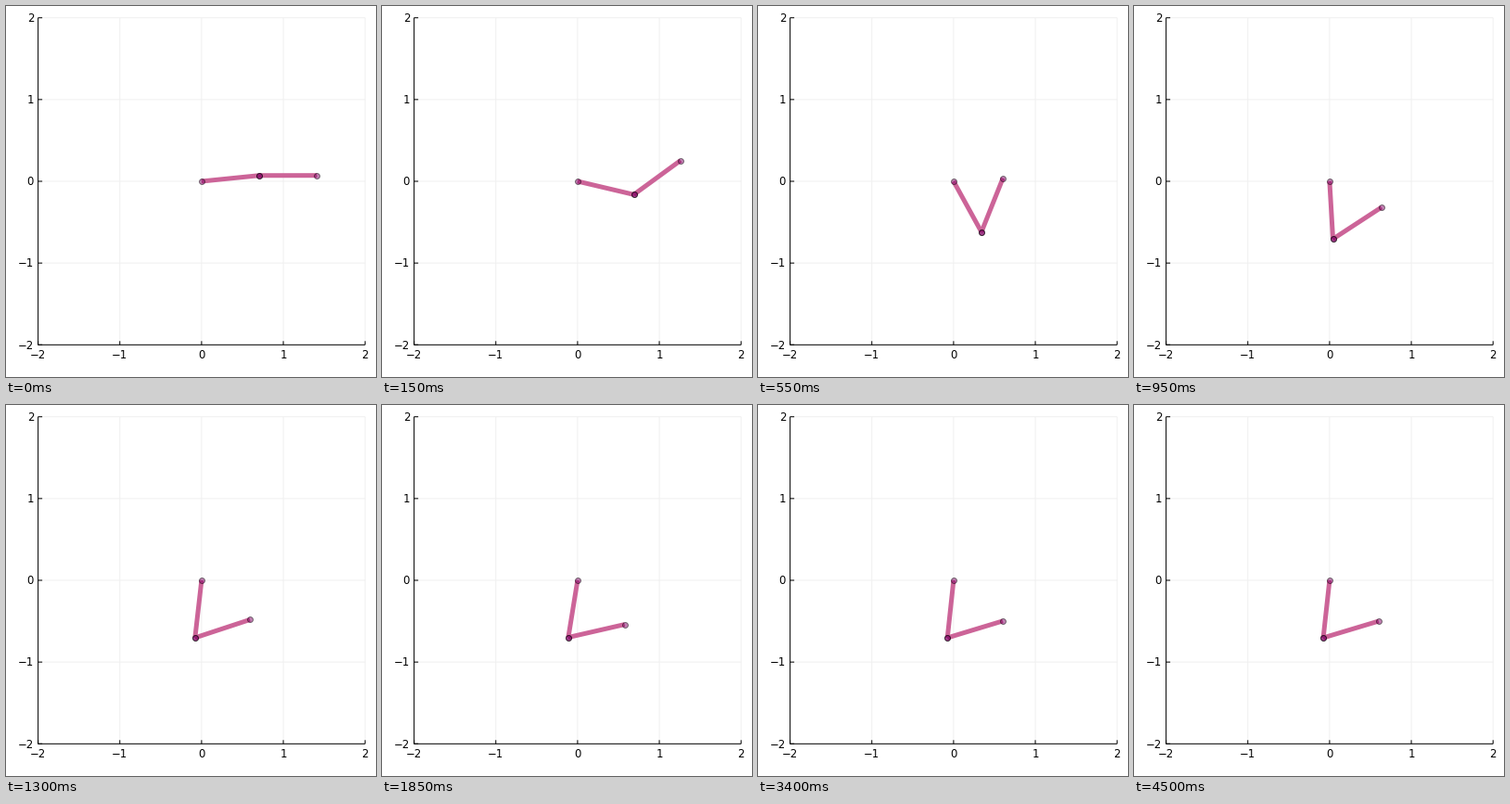
A matplotlib script for the animation above (4.55 s loop, 399 by 400 pixels).

```python
import numpy as np
import matplotlib.pyplot as plt
from matplotlib.animation import FuncAnimation

W, H, DPI = 399, 400, 100
FRAMES, INTERVAL = 91, 50
PX = 72 / DPI                         # points per pixel
X0, Y0, SCALE = 210.9, 189.0, 88.15   # pixel place of the data origin
LINK = np.sqrt(0.5)
GOAL = (0.6, -0.5)

ROSE = "#cc6498"
GRID = "#f0f0f0"
PLUM = (0.5, 0, 0.39, 0.5)
RIM = (0, 0, 0, 0.5)

# Joint angles that put the tip on the goal
REACH = np.hypot(*GOAL)
ELBOW = 2 * np.arccos(REACH / (2 * LINK))
SHOULDER = np.arctan2(GOAL[1], GOAL[0]) - ELBOW / 2


def sway(t):
    """Slow damped swing that both joints share."""
    return np.exp(-0.085 * t) * np.sin(0.09 * t)


def shoulder(t):
    pull = 1.28 * np.exp(-0.22 * t) - 0.28 * np.exp(-t)
    return SHOULDER + 0.734 * pull - 0.16 * sway(t - 25.5)


def elbow(t):
    snap = np.exp(-0.33 * t) * (np.cos(0.26 * t) + 1.33 * np.sin(0.26 * t))
    return ELBOW - 2.297 * snap - 0.047 * sway(t - 31)


def px(u):
    return X0 + SCALE * np.asarray(u)


def py(v):
    return Y0 - SCALE * np.asarray(v)


def arm(t):
    a = shoulder(t)
    b = a + elbow(t)
    x = LINK * np.cumsum([0, np.cos(a), np.cos(b)])
    y = LINK * np.cumsum([0, np.sin(a), np.sin(b)])
    return px(x), py(y)


fig = plt.figure(figsize=(W / DPI, H / DPI), dpi=DPI, facecolor="white")
ax = fig.add_axes([0, 0, 1, 1])
ax.set_xlim(0, W)
ax.set_ylim(H, 0)
ax.axis("off")


def rule(x, y, color="black", z=2):
    ax.plot(x, y, color=color, lw=PX, solid_capstyle="butt", snap=False, zorder=z)


left, right = px(-2), px(2)
top, bottom = py(2), py(-2)
font = dict(family="DejaVu Sans", size=11.6 * PX, color="black")

for n in range(-2, 3):
    x, y = px(n), py(n)
    rule([x, x], [top, bottom], GRID, 1)
    rule([left, right], [y, y], GRID, 1)
    rule([x, x], [bottom, bottom - 4])
    rule([left, left + 4.5], [y, y])
    label = str(n).replace("-", "\u2212")
    ax.text(x, 380, label, ha="center", va="baseline", **font)
    ax.text(30, y + 4.3, label, ha="right", va="baseline", **font)

rule([left, left], [top, bottom])
rule([left, right], [bottom, bottom])


def link():
    bar, = ax.plot([], [], color=ROSE, lw=5 * PX, solid_capstyle="butt",
                   snap=False, zorder=3)
    dots, = ax.plot([], [], "o", ms=6 * PX, mfc=PLUM, mec=RIM, mew=0.9 * PX,
                    snap=False, zorder=4)
    return bar, dots


links = [link(), link()]


def draw(i):
    x, y = arm(i)
    for k, parts in enumerate(links):
        for part in parts:
            part.set_data(x[k:k + 2], y[k:k + 2])
    return [part for parts in links for part in parts]


anim = FuncAnimation(fig, draw, frames=FRAMES, interval=INTERVAL,
                     repeat=True, repeat_delay=0, blit=False)
plt.show()
```
